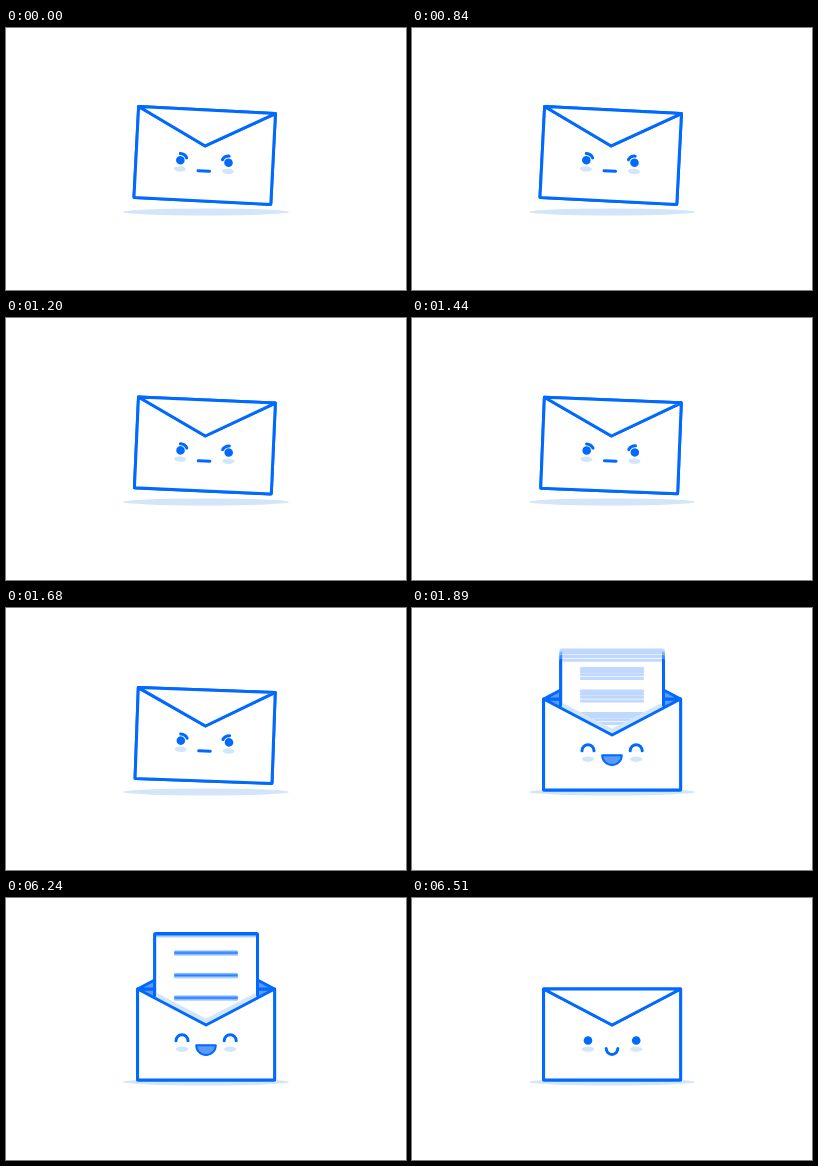
Animation, 400 px wide and 262 px high, one loop 7170 ms. Source, as an HTML page:

```html
<!DOCTYPE html>
<html lang="en">
<head>
<meta charset="utf-8">
<title>Envelope</title>
<style>
  html, body { margin: 0; width: 100%; height: 100%; overflow: hidden; background: #fff; }
  svg { display: block; width: 100%; height: 100%; }
  .line { fill: none; stroke: #0069ff; stroke-width: 3; stroke-linecap: round; stroke-linejoin: round; }
  .paper { fill: #fff; }
  .inner { fill: #5a9bf8; }
  .dot { fill: #0069ff; }
  .soft { fill: #d3e5f9; }
</style>
</head>
<body>
<svg viewBox="0 0 400 262">
  <defs>
    <clipPath id="pocket"><rect x="100" y="0" width="200" height="180"/></clipPath>
    <g id="sheet">
      <rect class="line paper" x="148.7" y="35.4" width="102.8" height="110" rx="1"/>
      <path class="line" d="M169.3 53.8H230.7M169.3 76.3H230.7M169.3 98.8H230.7"/>
    </g>
  </defs>
  <rect width="400" height="262" fill="#fff"/>
  <ellipse class="soft" cx="200" cy="184" rx="83.3" ry="3.4"/>
  <g id="envelope">
    <rect class="line inner" x="131.6" y="91" width="137" height="91" rx="1"/>
    <path id="flapBack" class="line inner"/>
    <g id="letter" clip-path="url(#pocket)"></g>
    <path id="shade" d="M150.3 97.2L200 123.2L249.9 97.2" fill="none" stroke="#d3e5f9" stroke-width="4.5"/>
    <path class="line paper" d="M131.6 91L200.1 127L268.6 91V182H131.6Z"/>
    <path id="flapFront" class="line paper"/>
    <ellipse class="soft" cx="176" cy="151.2" rx="6" ry="2.7"/>
    <ellipse class="soft" cx="224.2" cy="151.2" rx="6" ry="2.7"/>
    <g id="eyes" class="dot">
      <circle cx="176" cy="142.5" r="4.3"/>
      <circle cx="224.2" cy="142.5" r="4.3"/>
    </g>
    <path id="angry" class="line" d="M175.6 135.9Q180.4 136 182.2 139.9M224.6 135.9Q219.8 136 218 139.9M194.2 152H205.8"/>
    <g id="happy">
      <path class="line" d="M170 142.8a6 6 0 0 1 12 0M218.2 142.8a6 6 0 0 1 12 0"/>
      <path class="line inner" style="stroke-width:2" d="M190.2 147.2H209.8A9.8 9.8 0 0 1 190.2 147.2Z"/>
    </g>
    <path id="smile" class="line" d="M194.2 150.6a5.8 5.8 0 0 0 11.6 0"/>
  </g>
</svg>
<script>
const LOOP = 7170, STEP = 30;
const LIFT = 9, DEPTH = 62, GHOSTS = 4;
const SHAKE = 22, LAND = 57, OPENED = 69, CLOSE = 207;

const $ = id => document.getElementById(id);
const clamp = x => Math.max(0, Math.min(1, x));
const span = (k, a, b) => clamp((k - a) / (b - a));
const mix = (a, b, p) => a + (b - a) * p;
const inOut = p => p < .5 ? 2 * p * p : 1 - 2 * (1 - p) ** 2;
const out = p => 1 - (1 - p) ** 2;
const show = (el, on) => el.setAttribute("visibility", on ? "visible" : "hidden");

// Stacked sheets, weighted so that they average into a motion blur
const sheets = Array.from({ length: GHOSTS }, (_, i) => {
  const el = document.createElementNS("http://www.w3.org/2000/svg", "use");
  el.setAttribute("href", "#sheet");
  el.setAttribute("opacity", 1 / (i + 1));
  $("letter").append(el);
  return el;
});

function tilt(k) {
  const steps = Math.max(0, k - SHAKE + 1);
  const phase = (46.85 + 89.47 * steps) * Math.PI / 180;
  return 4.3 * Math.cos(phase) * (1 - span(k, LAND - 1, LAND + 3));
}

function letterY(k) {
  if (k >= CLOSE) return DEPTH * inOut(span(k, CLOSE, CLOSE + 6));
  if (k < 65) return mix(DEPTH, -5.6, out(span(k, 60, 65)));
  return mix(-5.6, 0, inOut(span(k, 65, 68)));
}

function flapTip(k) {
  const open = k < CLOSE ? span(k, LAND + 1, 62) : 1 - span(k, 212, 217);
  return mix(127, 55, inOut(open));
}

function draw(k) {
  const lift = LIFT * (1 - inOut(span(k, LAND - 1, LAND + 3)));
  $("envelope").setAttribute("transform", `translate(0 ${-lift}) rotate(${tilt(k)} 200 109.5)`);

  const tip = flapTip(k);
  const flap = `M131.6 91L200.1 ${tip}L268.6 91Z`;
  for (const id of ["flapBack", "flapFront"]) $(id).setAttribute("d", flap);
  show($("flapBack"), tip < 91);
  show($("flapFront"), tip >= 91);

  const y = letterY(k);
  const moving = Math.abs(y - letterY(k - 1)) > .01;
  const hasLetter = k > 60 && k < 216;
  sheets.forEach((el, i) => {
    const at = moving ? letterY(k - 1 + (i + .5) / GHOSTS) : y;
    el.setAttribute("transform", `translate(0 ${at})`);
    show(el, hasLetter && (moving || i === 0));
  });
  show($("shade"), hasLetter && y < 40);

  const angry = k < 60, happy = !angry && k < 213;
  show($("angry"), angry);
  show($("happy"), happy);
  show($("smile"), !angry && !happy);
  show($("eyes"), !happy);
}

const start = performance.now();
function tick() {
  const t = (performance.now() - start) % LOOP;
  draw(Math.floor((t + .5) / STEP) % (LOOP / STEP));
  requestAnimationFrame(tick);
}
tick();
</script>
</body>
</html>
```
